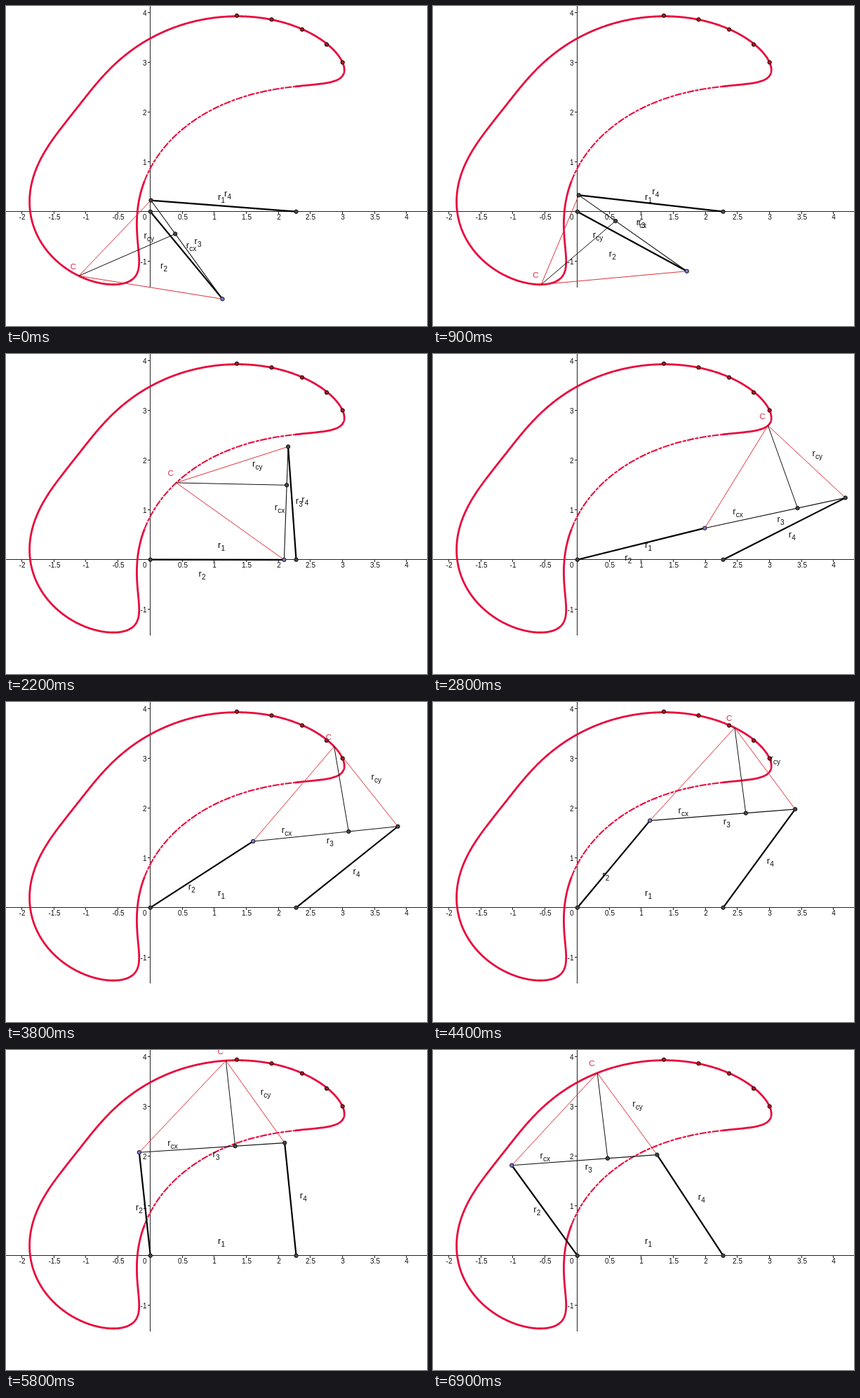
Animation of 600 by 457 pixels, one loop 7.1 s. Source, as an HTML page with a canvas:

```html
<!DOCTYPE html>
<html>
<head>
<meta charset="utf-8">
<title>Four-bar linkage</title>
<style>
  html, body { margin: 0; width: 100%; height: 100%; overflow: hidden; background: #fff; }
  canvas { display: block; width: 600px; height: 457px; }
</style>
</head>
<body>
<canvas id="stage" width="600" height="457"></canvas>
<script>
const g = document.getElementById('stage').getContext('2d');
const FONT = '"Liberation Sans", Arial, sans-serif';
const RED = '#e8083c', THIN_RED = '#e03038', BLACK = '#111';
const LOOP = 7100, STEP = 100, LAST = 6900;

// World units to pixels; the two axes have different scales.
const OX = 205.8, OY = 293.7, SX = 91.4, SY = 71;
const px = ([x, y]) => [OX + x * SX, OY - y * SY];

// Link lengths, and the tracing point relative to the coupler.
const GROUND = 2.273, CRANK = 2.085, BAR = 2.276;
const ALONG = 1.502, ACROSS = 1.725;

// Crank angle in degrees over time.
const KEYS = [[0, -57.4], [800, -38], [1700, -11.5], [2400, 4.5], [2800, 17.7], [3800, 39.8],
  [4000, 45.3], [4800, 69], [5600, 93], [5800, 94.8], [LAST, 119.4]];

function crankAngle(t) {
  let i = 1;
  while (i < KEYS.length - 1 && t > KEYS[i][0]) i++;
  const [t0, a0] = KEYS[i - 1], [t1, a1] = KEYS[i];
  return a0 + (a1 - a0) * (t - t0) / (t1 - t0);
}

function linkage(deg) {
  const th = deg * Math.PI / 180;
  const ax = CRANK * Math.cos(th), ay = CRANK * Math.sin(th);
  const dx = GROUND - ax, dy = -ay, d = Math.hypot(dx, dy);
  const h = Math.sqrt(BAR * BAR - d * d / 4);
  const bx = ax + dx / 2 - dy / d * h, by = ay + dy / 2 + dx / d * h;
  const ux = (bx - ax) / BAR, uy = (by - ay) / BAR;
  const mx = ax + ALONG * ux, my = ay + ALONG * uy;
  return {
    A: px([ax, ay]), B: px([bx, by]), D: px([mx, my]),
    C: px([mx - ACROSS * uy, my + ACROSS * ux])
  };
}

function tracePath(from, to) {
  const p = new Path2D();
  for (let a = from; a <= to; a += 0.25) p.lineTo(...linkage(a).C);
  return p;
}
const slowTrace = tracePath(6.5, 357.5), fastTrace = tracePath(-2.5, 6.5);

function line(p, q, color, width) {
  g.strokeStyle = color;
  g.lineWidth = width;
  g.beginPath();
  g.moveTo(...p);
  g.lineTo(...q);
  g.stroke();
}

function dot([x, y], fill) {
  g.fillStyle = fill;
  g.strokeStyle = '#111';
  g.lineWidth = 1;
  g.beginPath();
  g.arc(x, y, 2.7, 0, 7);
  g.fill();
  g.stroke();
}

function text(s, x, y, size, align = 'left', color = '#111') {
  g.font = `${size}px ${FONT}`;
  g.textAlign = align;
  g.fillStyle = color;
  g.fillText(s, x, y);
}

function rLabel(sub, x, y) {
  text('r', x, y, 13);
  text(sub, x + 4.5, y + 4, 10);
}

// Label beside the middle of a segment, shifted by a fixed offset.
function sideLabel(sub, p, q, ox = 0, oy = 0) {
  const dx = q[0] - p[0], dy = q[1] - p[1], k = 13.5 / Math.hypot(dx, dy);
  rLabel(sub, (p[0] + q[0]) / 2 - dy * k + ox, (p[1] + q[1]) / 2 + dx * k + oy);
}

function axes() {
  line([0, 293.5], [600, 293.5], '#222', 1);
  line([205.5, 0], [205.5, 402], '#222', 1);
  for (let v = -2; v <= 4; v += 0.5) {
    const x = Math.round(OX + v * SX);
    if (v) {
      line([x - 0.5, 294], [x - 0.5, 297], '#222', 1);
      if (v !== 0) text(String(v), x, 305, 10, 'center');
    }
  }
  for (let v = -1; v <= 4; v++) {
    if (!v) continue;
    const y = Math.round(OY - v * SY);
    line([202, y - 0.5], [206, y - 0.5], '#222', 1);
    text(String(v), 200.5, y + 3.5, 10, 'right');
  }
  text('0', 200.5, 305, 10, 'right');
}

function trace() {
  g.strokeStyle = RED;
  g.lineWidth = 2.8;
  g.stroke(slowTrace);
  g.lineWidth = 2.1;
  g.setLineDash([10, 1.5, 5, 1.5]);
  g.stroke(fastTrace);
  g.setLineDash([]);
}

const O = px([0, 0]), P = px([GROUND, 0]);
const MARKS = [[329, 13.8], [378.5, 19.3], [422, 33.5], [457, 55], [479.7, 80.5]];

function draw(t) {
  const { A, B, C, D } = linkage(crankAngle(t));
  g.fillStyle = '#fff';
  g.fillRect(0, 0, 600, 457);
  axes();
  trace();

  line(A, C, THIN_RED, 1);
  line(B, C, THIN_RED, 1);
  line(A, B, BLACK, 1.1);
  line(D, C, BLACK, 1);
  line(O, A, '#000', 2.2);
  line(P, B, '#000', 2.2);

  MARKS.forEach(m => dot(m, '#b4141c'));
  [O, P, B, D].forEach(p => dot(p, '#444'));
  dot(A, '#7a7ad0');

  rLabel('1', 302, 277);
  sideLabel('2', O, A, -26.6, 10.4);
  sideLabel('3', A, B);
  sideLabel('4', P, B);
  sideLabel('cx', A, D, -29, -18.5);
  sideLabel('cy', D, C, 29.3, -10.7);
  text('C', C[0] - 12, C[1] - 9.5, 11.5, 'left', '#d8304c');
}

function tick() {
  const t = performance.now() % LOOP;
  draw(Math.min(LAST, Math.floor(t / STEP) * STEP));
  requestAnimationFrame(tick);
}
tick();
</script>
</body>
</html>
```
